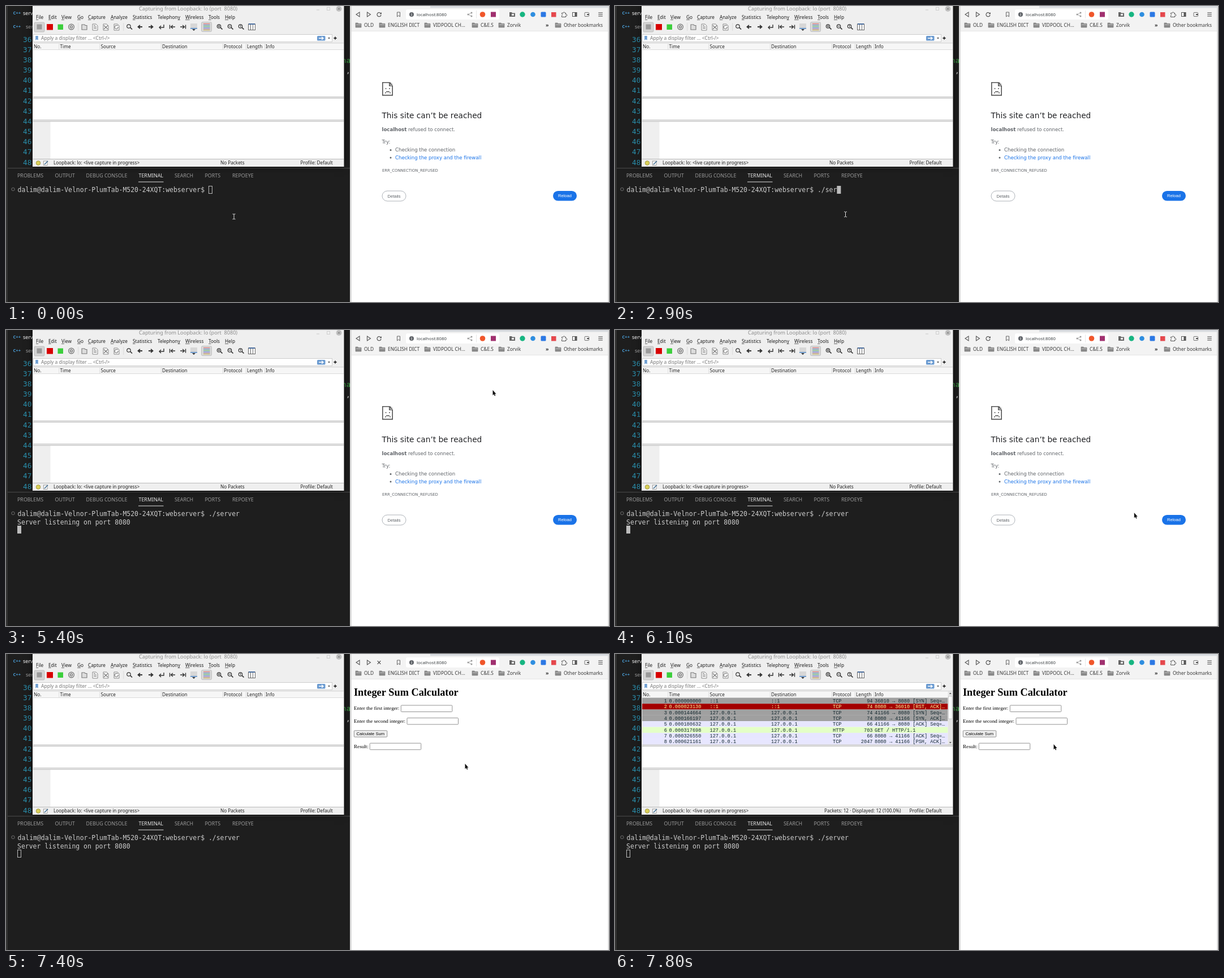
Recreate the animation shown at these times as an HTML page with a canvas. Size 1066 px wide and 525 px high, loop 8 s.

```html
<!DOCTYPE html>
<html lang="en">
<head>
<meta charset="utf-8">
<title>Local web server demo</title>
<style>
  html, body { margin: 0; width: 100%; height: 100%; overflow: hidden; background: #1e1e1e; }
  canvas { display: block; }
</style>
</head>
<body>
<canvas id="stage" width="1066" height="525"></canvas>
<script>
const g = document.getElementById('stage').getContext('2d');
const LOOP = 8000;
const UI = '"Noto Sans", "Open Sans", sans-serif';
const DEJAVU = '"DejaVu Sans", sans-serif';
const CODE = '"DejaVu Sans Mono", monospace';
const MONO = '"Liberation Mono", monospace';
const SANS = '"Liberation Sans", Arial, sans-serif';
const SERIF = '"Liberation Serif", serif';

// ---- drawing helpers ----
function rect(x, y, w, h, color) {
  g.fillStyle = color;
  g.fillRect(x, y, w, h);
}
function frame(x, y, w, h, color, lw = 1) {
  g.strokeStyle = color;
  g.lineWidth = lw;
  g.strokeRect(x, y, w, h);
}
function round(x, y, w, h, r, fill, stroke) {
  g.beginPath();
  g.roundRect(x, y, w, h, r);
  if (fill) { g.fillStyle = fill; g.fill(); }
  if (stroke) { g.strokeStyle = stroke; g.lineWidth = 0.8; g.stroke(); }
}
function dot(x, y, r, fill, stroke, lw = 1) {
  g.beginPath();
  g.arc(x, y, r, 0, 7);
  if (fill) { g.fillStyle = fill; g.fill(); }
  if (stroke) { g.strokeStyle = stroke; g.lineWidth = lw; g.stroke(); }
}
function path(d, x, y, stroke, lw = 1, fill) {
  const p = new Path2D(d);
  g.save();
  g.translate(x, y);
  if (fill) { g.fillStyle = fill; g.fill(p); }
  if (stroke) { g.strokeStyle = stroke; g.lineWidth = lw; g.stroke(p); }
  g.restore();
}
// y is the middle of the capital letters
function text(s, x, y, size, color, family = UI, weight = 400, align = 'left') {
  g.font = `${weight} ${size}px ${family}`;
  g.textAlign = align;
  g.fillStyle = color;
  g.fillText(s, x, y + size * 0.36);
}
function clip(x, y, w, h, draw) {
  g.save();
  g.beginPath();
  g.rect(x, y, w, h);
  g.clip();
  draw();
  g.restore();
}

// ---- code editor and terminal ----
const PROMPT = 'dalim@dalim-Velnor-PlumTab-M520-24XQT:webserver$ ';
const TYPED = [[0, ''], [1300, '.'], [1700, './'], [2800, './se'], [2900, './ser'], [3400, './server']];
const CELL = 6.886;

const latest = (list, t) => list.filter(k => k[0] <= t).pop();

function editor() {
  rect(0, 0, 609, 525, '#1e1e1e');
  rect(0, 0, 3, 525, '#333');
  for (const y of [12.5, 36.5]) text('C++', 12.5, y, 7.6, '#4a9fd8', UI, 700);
  text('server', 30, 12.5, 9, '#fff', UI, 500);
  text('server', 35, 36.5, 9, '#a5a5a5');
  for (let n = 36; n <= 48; n++) text(n, 30, 59 + (n - 36) * 18.17, 12.7, '#2b91af', CODE);
  clip(597, 80, 11, 50, () => {
    text('ha', 594, 96, 12.7, '#3fae49', CODE);
    text(',', 601, 114, 12.7, '#d4d4d4', CODE);
  });
}

function terminal(t) {
  rect(3, 287, 605, 1.2, '#454545');
  const tabs = { PROBLEMS: 20, OUTPUT: 86.5, 'DEBUG CONSOLE': 141.5, TERMINAL: 234.5,
    SEARCH: 298, PORTS: 351.5, REPOEYE: 400 };
  for (const [name, x] of Object.entries(tabs))
    text(name, x, 301, 8.9, name == 'TERMINAL' ? '#e7e7e7' : '#9a9a9a');
  rect(234, 311.5, 44.5, 1, '#e0e0e0');
  dot(12.5, 325, 2.7, null, '#7a7a7a', 0.9);

  const typed = latest(TYPED, t)[1], running = t >= 4000;
  text(PROMPT + typed, 20.5, 326, 11.44, '#ccc', CODE);
  if (running) text('Server listening on port 8080', 20, 340.5, 11.44, '#ccc', CODE);
  const x = running ? 20 : 20.5 + (PROMPT.length + typed.length) * CELL;
  const y = running ? 347 : 319;
  if (t >= 300 && t < 6900) rect(x, y, 7, 14, '#bcbcbc');
  else frame(x + 0.5, y + 0.5, 6, 13, '#bcbcbc');
}

// ---- packet capture window ----
const MENU = { File: 53, Edit: 75, View: 98, Go: 126, Capture: 145, Analyze: 185, Statistics: 224,
  Telephony: 268, Wireless: 317, Tools: 358, Help: 387 };
const COLUMNS = { 'No.': 49, Time: 95.5, Source: 167.5, Destination: 276, Protocol: 385, Length: 426, Info: 459 };
const LOCAL = '127.0.0.1';
const PACKETS = [
  ['0.000000000', '::1', 'TCP', 94, '36010 → 8080 [SYN] Seq=…', '#a0a0a0'],
  ['0.000023130', '::1', 'TCP', 74, '8080 → 36010 [RST, ACK]…', '#a40000'],
  ['0.000144664', LOCAL, 'TCP', 74, '41166 → 8080 [SYN] Seq=…', '#a0a0a0'],
  ['0.000166197', LOCAL, 'TCP', 74, '8080 → 41166 [SYN, ACK]…', '#a0a0a0'],
  ['0.000180632', LOCAL, 'TCP', 66, '41166 → 8080 [ACK] Seq=…', '#e7e6ff'],
  ['0.000317698', LOCAL, 'HTTP', 703, 'GET / HTTP/1.1', '#e4ffc7'],
  ['0.000326550', LOCAL, 'TCP', 66, '8080 → 41166 [ACK] Seq=…', '#e7e6ff'],
  ['0.000621161', LOCAL, 'TCP', 2047, '8080 → 41166 [PSH, ACK]…', '#e7e6ff']
];
const INK = '#333';
const ARROW = 'M4 0H-3M0 -3L-3.5 0L0 3';

function magnifier(x, sign) {
  dot(x - 1, 36, 3.2, null, INK, 1.2);
  path('M1.5 2L5 5.5', x, 36, INK, 1.7);
  if (sign) path(sign, x - 1, 36, INK, 0.9);
}
function sheet(x, mark) {
  path('M-4 -5H2L5 -2V6H-4Z', x, 37, '#888', 1, '#f8f8f8');
  path(mark, x, 37, '#777', 1.1);
}
function mirrored(d, x, lw) {
  g.save();
  g.translate(x, 37);
  g.scale(-1, 1);
  path(d, 0, 0, INK, lw);
  g.restore();
}

function toolbar() {
  round(50, 29, 18, 17, 2, '#d4d4d4', '#b5b5b5');
  rect(54.5, 32.5, 9, 9, '#9a9a9a');
  rect(72, 32, 11, 10.5, '#d80000');
  rect(91.5, 32.5, 9.5, 9.5, '#3ccf3c');
  dot(115.5, 37, 4.8, null, '#777', 1.4);
  dot(115.5, 37, 2, null, '#777', 1.4);
  path('M-4 -4H1L2 -2.5H5V5H-4Z', 138, 37, '#777', 1.1, '#ddd');
  sheet(157, 'M-2 0H3M-2 2.5H3M-2 -2.5H1');
  sheet(176, 'M-3 -2.5L4 4M4 -2.5L-3 4');
  sheet(195, 'M3 0A3 3 0 1 1 0 -2.5H3');
  magnifier(218);
  path(ARROW, 237, 37, INK, 1.8);
  mirrored(ARROW, 256, 1.8);
  path('M4 -4V1H-3M-1 -2L-4 1L-1 4', 275, 37, INK, 1.4);
  const end = 'M5 0H-2M1 -3L-2.5 0L1 3M-4.5 -3.5V3.5';
  path(end, 294, 37, INK, 1.4);
  mirrored(end, 313, 1.4);
  rect(326, 31, 12, 8, '#d7d7d7');
  rect(326, 39, 12, 1.5, '#4b83c3');
  path('M-3 0H3L0 3Z', 332, 41, null, 1, INK);
  round(345.5, 28.5, 18, 17, 2, '#d9d9d9', '#b5b5b5');
  ['#d66', '#5a88c8', '#62b862', '#5a88c8', '#9b70b5', '#c9a83c']
    .forEach((c, i) => rect(349, 31 + i * 2.2, 11.5, 1, c));
  magnifier(377.5, 'M-2 0H2M0 -2V2');
  magnifier(396.5, 'M-2 0H2');
  magnifier(415.5, 'M-.7 -1L.3 -2V2');
  rect(428.5, 32, 12, 10.5, '#fff');
  frame(428.5, 32, 12, 10.5, '#666');
  path('M-2 -5V5M2 -5V5', 434.5, 37.2, '#666');
  rect(429, 31, 11, 2, '#4b6fa0');
  for (const x of [127.5, 207.5]) rect(x, 30, 0.7, 14, '#d0d0d0');
}

function packetRows() {
  PACKETS.forEach(([time, host, protocol, length, info, bg], i) => {
    const top = 77.8 + i * 10.34, y = top + 5.2;
    const ink = i == 1 ? '#fffc9c' : '#12272e';
    const cell = (s, x, align) => text(s, x, y, 8.65, ink, MONO, 400, align);
    rect(48, top, 540.5, 10.4, bg);
    cell(i + 1, 92, 'right');
    cell(time, 95.5);
    cell(host, 167.5);
    cell(host, 276);
    cell(protocol, 385);
    cell(length, 455.5, 'right');
    cell(info, 459);
  });
  rect(588.5, 66, 8.5, 95, '#e4e4e4');
  rect(589.5, 75, 6.5, 40, '#fafafa');
  frame(589.5, 75, 6.5, 40, '#bbb', 0.7);
  path('M-2 1H2L0 -1.5Z', 592.8, 70, null, 1, '#555');
  path('M-2 -1H2L0 1.5Z', 592.8, 157, null, 1, '#555');
}

function capture(t) {
  const full = t >= 7500;
  g.save();
  g.shadowColor = 'rgba(0,0,0,.6)';
  g.shadowBlur = 12;
  rect(47, -10, 550.5, 295, '#efefef');
  g.restore();
  text('Capturing from Loopback: lo (port  8080)', 235, 5, 9.15, '#8b8b8b', UI, 500);
  rect(549, 6.5, 5, 0.9, '#c4c4c4');
  frame(567.5, 2.5, 5, 5, '#ccc', 0.9);
  dot(588.5, 5, 5, '#c2c2c2');
  path('M-2 -2L2 2M2 -2L-2 2', 588.5, 5, '#777');

  for (const [name, x] of Object.entries(MENU)) {
    text(name, x, 20, 8.25, '#1c1c1c');
    const at = name == 'Telephony' ? name.length - 1 : 0;
    rect(x + g.measureText(name.slice(0, at)).width, 24.3, g.measureText(name[at]).width, 0.7, '#333');
  }
  toolbar();

  rect(48.5, 51, 528, 12.5, '#fff');
  frame(48.5, 50.5, 528, 13, '#c4c4c4', 0.8);
  path('M-2.3 -4H2.3V4L0 2L-2.3 4Z', 54.5, 57, null, 1, '#6f9fd2');
  text('Apply a display filter … <Ctrl-/>', 62, 57, 8.5, '#777');
  round(550, 53, 14.5, 8.5, 1.5, '#6b9bd1');
  path('M-4 0H3M1 -2.5L4 0L1 2.5', 557, 57.2, '#fff', 1.4);
  path('M-2 -1H2L0 1.5Z', 571, 57, null, 1, '#444');
  path('M-2.5 0H2.5M0 -2.5V2.5', 582, 57, '#333', 1.8);

  rect(48, 66, 549, 95, '#fff');
  rect(48, 66, 549, 11.8, '#f6f6f6');
  rect(48, 65.5, 549, 0.7, '#c2c2c2');
  rect(48, 77.2, 549, 0.7, '#d0d0d0');
  for (const [name, x] of Object.entries(COLUMNS)) {
    text(name, x, 72, 8.25, '#222');
    if (x > 50) rect(x - 2, 67, 0.7, 10, '#cfcfcf');
  }
  if (full) packetRows();

  rect(48, 163.5, 549, 38.5, '#fff');
  rect(48, 205, 549, 66, '#fff');
  rect(48, 205, 30.5, 66, '#efefef');
  for (const y of [160.7, 163, 201.7, 204.3, 271]) rect(47.5, y, 549.5, 0.9, '#b4b4b4');

  dot(57, 278.5, 3.8, '#d9cf58', '#928b3c', 0.8);
  rect(66.5, 275, 6.5, 7.5, '#fff');
  frame(66.5, 275, 6.5, 7.5, '#888', 0.8);
  path('M-2 2L4 -4', 70, 279, '#3b6a8f', 1.5);
  text('Loopback: lo: <live capture in progress>', 84, 278.5, 8.2, '#222');
  if (full) text('Packets: 12 · Displayed: 12 (100.0%)', 370, 278.5, 8.2, '#222');
  else text('No Packets', 379, 278.5, 8.2, '#222');
  text('Profile: Default', 520.5, 278.5, 8.2, '#222');
}

// ---- browser ----
const BOOKMARKS = { OLD: 633, 'ENGLISH DICT': 675, 'VIDPOOL CH...': 755, 'C&E.S': 839, Zorvik: 886,
  'Other bookmarks': 986 };

function browserBar(loading) {
  rect(608, 0, 458, 525, '#dcdcdc');
  rect(611, 0, 453, 44.5, '#f3f3f3');
  rect(750, 0, 314, 3.5, '#d9dce0');
  path('M2.5 -4V4L-3.5 0Z', 622.5, 15, '#555', 1.1);
  path('M-2.5 -4V4L3.5 0Z', 641, 15, '#555', 1.1);
  if (loading) path('M-2.8 -2.8L2.8 2.8M2.8 -2.8L-2.8 2.8', 659.5, 15, '#444', 1.2);
  else {
    path('M3 -2A3.6 3.6 0 1 0 3.6 1', 659.5, 15, '#555', 1.2);
    path('M4.4 -4V-.6H1Z', 659.5, 15, null, 1, '#555');
  }
  path('M-2.5 -4H2.5V4L0 1.8L-2.5 4Z', 694, 15, '#666', 1);
  round(707, 6, 165, 18, 3, '#fff');
  dot(717, 15, 4, '#5f6368');
  rect(716.5, 14.5, 1, 2.8, '#fff');
  rect(716.5, 12.6, 1, 1, '#fff');
  text('localhost:8080', 726, 15, 7.8, '#3c4043');
  path('M3 -3L-3 0L3 3', 820, 15, '#999', 0.8);
  for (const [x, y] of [[823, 12], [817, 15], [823, 18]]) dot(x, y, 1.5, '#999');
  rect(831, 8, 0.7, 14, '#ddd');
  dot(842.5, 15, 4.8, '#f0562b');
  rect(857, 10.5, 9, 9, '#a0306f');

  path('M-5 -4H-1L0 -2.5H5V4H-5Z', 895, 15, null, 1, '#666');
  rect(894, 14, 4, 3, '#eee');
  dot(913, 15, 4.7, '#16b581');
  dot(931.5, 15, 4.3, '#2e8ee0');
  round(945.5, 10.5, 9, 9, 1.5, '#2b78e4');
  rect(964, 11, 8.5, 8.5, '#e5484d');
  path('M-4 -2.5H-1.5A1.5 1.5 0 1 1 1.5 -2.5H3V0A1.5 1.5 0 1 1 3 2.5V4.5H-4V2A1.6 1.6 0 0 0 -4 -1Z',
    986.5, 15, '#555');
  frame(1001.5, 11.5, 7.5, 7, '#555', 1);
  rect(1005.5, 11.5, 3.5, 7, '#555');
  round(1023, 11.5, 7.5, 7, 1, null, '#555');
  rect(1027, 14, 4, 2.2, '#555');
  path('M-3.8 -3H3.8M-3.8 0H3.8M-3.8 3H3.8', 1051, 15, '#444', 1.1);

  for (const [name, x] of Object.entries(BOOKMARKS)) {
    path('M0 -4H4L5 -2.8H10V4H0Z', x - 15, 34, '#777', 0.6, '#8a8a8a');
    rect(x - 14, 32.7, 8, 0.7, '#ddd');
    text(name, x, 34, 8.35, '#3a3a3a');
  }
  text('»', 954, 33.5, 9, '#333', UI, 600);
  rect(611, 44, 453, 0.8, '#dedede');
  rect(611, 44.8, 453, 481, '#fff');
}

function errorPage() {
  const gray = '#5f6368', link = '#1a73e8';
  path('M.8 .8H12.5M.8 0V24M0 23.4H19M18.2 24V6.5M12.8 0V6.5H19M13 1.5H15V4H18', 665, 135, '#535353', 1.6);
  path('M5.5 11.5H7.5M12 11.5H14M7 17H13M5 19H7M13 19H15', 665, 135, '#535353', 1.7);
  const say = (s, x, y, color = gray, size = 8.57, weight) => text(s, x, y, size, color, DEJAVU, weight);
  say('This site can’t be reached', 664.5, 194, '#202124', 13.68);
  say('localhost', 664.5, 218.5, gray, 8.57, 700);
  const w = g.measureText('localhost').width;
  say(' refused to connect.', 664.5 + w, 218.5);
  say('Try:', 664.5, 241);
  say('Checking the connection', 688, 255);
  say('Checking the proxy and the firewall', 688, 268.5, link);
  for (const y of [255.5, 269]) dot(680, y, 1.5, gray);
  say('ERR_CONNECTION_REFUSED', 665, 291.5, gray, 6.85);
  round(665, 328, 42, 18, 9, '#fff', '#9aa0a6');
  text('Details', 686, 337, 7.5, gray, SANS, 400, 'center');
  round(967, 328, 42, 17.5, 8.7, link);
  text('Reload', 988, 336.7, 7.5, '#fff', SANS, 400, 'center');
}

function formPage() {
  const field = (label, x, y) => {
    text(label, 615, y, 9.14, '#000', SERIF);
    round(x, y - 5.2, 90.5, 11.5, 1.2, '#fff', '#767676');
  };
  text('Integer Sum Calculator', 615, 67.5, 18.28, '#000', SERIF, 700);
  field('Enter the first integer:', 698.3, 96.2);
  field('Enter the second integer:', 709, 118.6);
  field('Result:', 643.2, 163.4);
  round(615.3, 135.8, 58.5, 11.4, 1.2, '#efefef', '#767676');
  text('Calculate Sum', 644.3, 141.4, 7.62, '#000', SANS, 400, 'center');
}

// ---- mouse: time, x, y; every move is a hard step ----
const MOVES = [
  [0, 403, 373.5], [600, 407.5, 369.5], [5000, 425, 358], [5100, 500, 300], [5200, 640, 215],
  [5300, 780, 142], [5400, 860.5, 106.5], [5500, 865, 99], [5600, 850, 112], [5700, 815, 150],
  [5800, 782, 194], [5900, 815, 240], [6000, 870, 288], [6100, 917.8, 324], [6200, 945, 333],
  [6300, 966, 335], [6400, 978, 336], [6500, 985, 336], [6600, 988, 336], [6900, 858, 298],
  [7100, 826, 216], [7400, 811.5, 194.5], [7700, 792, 175], [7800, 775.5, 160]
];
function mouse(t) {
  const [, x, y] = latest(MOVES, t);
  if (x < 608 && y > 315) {
    const beam = 'M-2.5 -4.5H-.8L0 -4L.8 -4.5H2.5M0 -4V4M-2.5 4.5H-.8L0 4L.8 4.5H2.5';
    path(beam, x, y, '#111', 2.4);
    path(beam, x, y, '#eee', 1);
  } else if (x > 967 && y > 328) {
    path('M-1 0Q0 -1 1 0V4L4.5 5V8L3 11H-2L-5 6Q-4 4.5 -2.5 6L-1 7Z', x, y, '#111', 0.9, '#fff');
  } else {
    const arrow = 'M0 0V9.3L2 7.6L3.4 10.6L4.8 10L3.5 7H6Z';
    path(arrow, x, y, '#fff', 1.4);
    path(arrow, x, y, null, 1, '#111');
  }
}

function draw(now) {
  const t = now % LOOP;
  editor();
  terminal(t);
  capture(t);
  browserBar(t >= 6900 && t < 7500);
  if (t < 7400) errorPage(); else formPage();
  mouse(t);
}

const start = performance.now();
function tick() {
  draw(performance.now() - start);
  requestAnimationFrame(tick);
}
tick();
</script>
</body>
</html>
```
